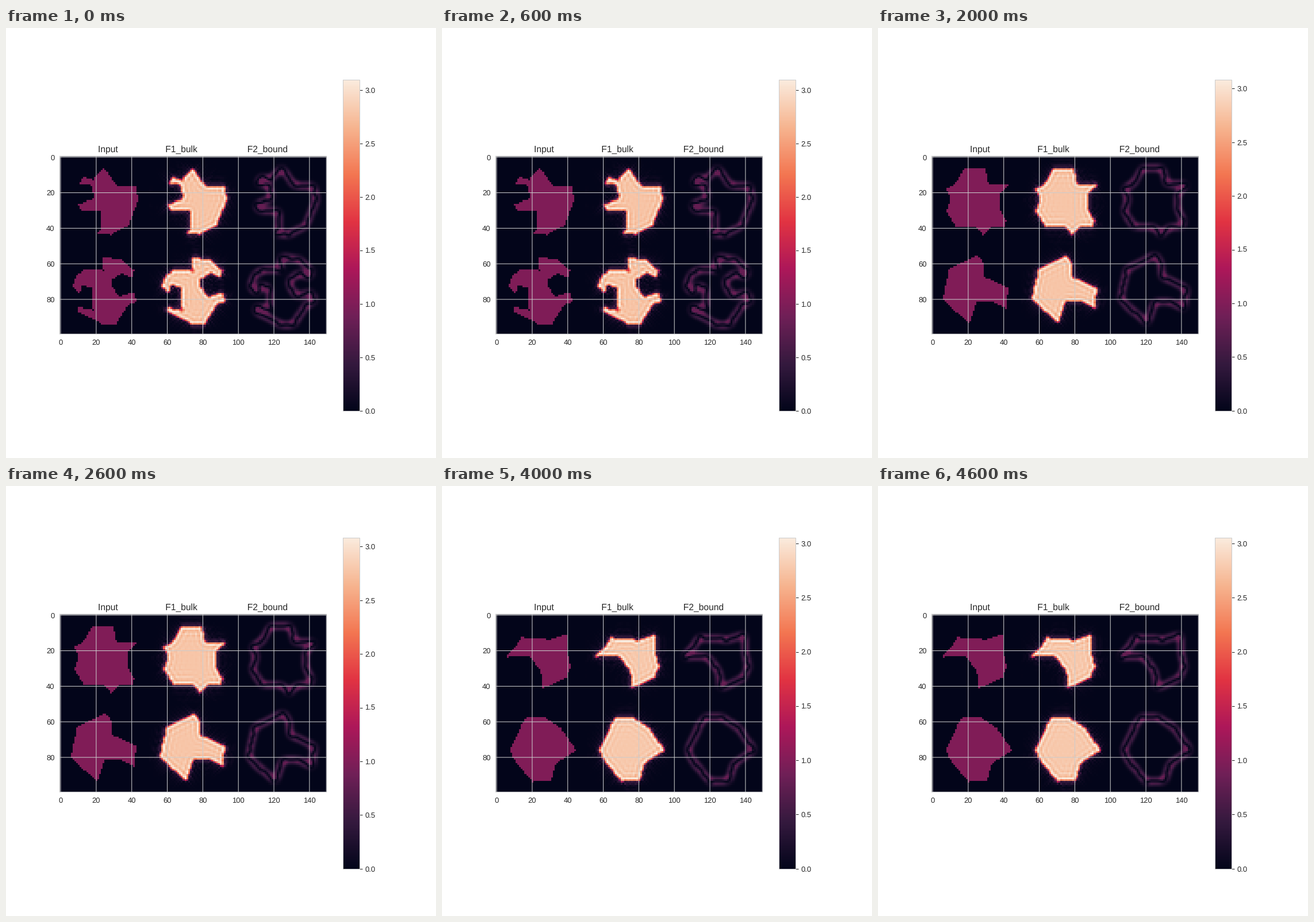
A matplotlib script for the animation above (5000 ms loop, 748 by 748 pixels).

```python
import numpy as np
import matplotlib.pyplot as plt
from matplotlib.animation import FuncAnimation
from matplotlib.colors import LinearSegmentedColormap
from matplotlib.path import Path

INK, RULE = "0.15", "0.8"
SIZE = 50

plt.rcParams.update({
    "font.family": "Liberation Sans", "text.hinting": "none",
    "text.color": INK, "xtick.color": INK, "ytick.color": INK,
    "axes.edgecolor": RULE, "grid.color": RULE,
    "axes.axisbelow": True, "xtick.bottom": False, "ytick.left": False,
})

EMBER = LinearSegmentedColormap.from_list("ember", [
    "#03051a", "#35193e", "#701f57", "#ad1759",
    "#e13342", "#f37651", "#f6b48f", "#faebdd"])

# Both filters depend only on radial frequency, in units of Nyquist
freq = 2 * np.fft.fftfreq(SIZE)
K = np.hypot(freq[:, None], freq[None, :])
LOW_PASS = np.exp(-(K / 0.72) ** 16)
EDGE_PASS = (K / 0.3) ** 2 * np.exp(1 - (K / 0.3) ** 2)
STRAIGHT_EDGE = 0.33    # peak of EDGE_PASS along a straight border


def respond(mask, transfer):
    return np.abs(np.fft.ifft2(np.fft.fft2(mask) * transfer).real)


def row(corners, top):
    """Mask, bulk response and boundary response, side by side."""
    y, x = np.mgrid[top:top + SIZE, :SIZE]
    inside = Path(corners).contains_points(np.column_stack([x.ravel(), y.ravel()]))
    mask = inside.reshape(SIZE, SIZE).astype(float)
    bulk = 2.78 * respond(mask, LOW_PASS)
    bound = 0.5 * (respond(mask, EDGE_PASS) / STRAIGHT_EDGE) ** 1.5
    return np.hstack([mask, bulk, np.minimum(bound, 0.8)])


def scene(vmax, upper, lower):
    return vmax, np.vstack([row(upper, 0), row(lower, SIZE)])


arms = scene(
    3.098,
    [(24.5, 6.5), (31, 16), (42, 16), (43.5, 24.5), (38, 38.5), (28, 44),
     (21, 43), (23, 40), (23, 31), (12, 30.5), (9.5, 27), (19, 23.5),
     (16.5, 15), (10.5, 15), (13, 11.5), (18, 13)],
    [(23, 56.5), (33.5, 57.5), (41, 64), (40.5, 68), (34, 65.5), (28.5, 69),
     (28.5, 73), (33, 78.5), (41, 76), (42.5, 81.5), (38, 83), (31, 94),
     (23, 94), (10, 87), (10, 84.5), (18, 86), (18, 74), (12, 72),
     (10.5, 77), (6.5, 73), (8.5, 67), (14.5, 63), (24, 64)])

hook = scene(
    3.115,
    [(13, 8.5), (31.5, 6.5), (36, 15), (43, 18.5), (42, 32), (40, 33.5),
     (39, 29), (29, 24.5), (24, 29), (27, 35), (32.5, 36), (32.5, 43),
     (20, 43), (11.5, 33), (7.5, 23), (11, 13)],
    [(24.5, 55), (33, 60), (36.5, 61.5), (42.5, 70), (38.5, 74.5),
     (37.5, 89.4), (18.5, 89.4), (10, 82), (7.4, 76), (7.4, 68), (12, 63)])

star = scene(
    3.084,
    [(18, 6), (29.5, 6.5), (31, 15), (42.5, 15.4), (37, 22), (37, 29),
     (41, 36), (40.5, 39.5), (33, 39), (28, 44), (24, 39), (13, 39),
     (7.5, 31), (10, 24), (7.5, 18), (13, 15)],
    [(25, 55), (28.5, 60), (28.5, 67.3), (42.5, 74), (41, 85), (34, 81.5),
     (25, 81), (20.5, 94), (5.5, 80), (9, 63.5)])

cog = scene(
    3.098,
    [(18, 6.5), (35.5, 6.8), (36, 14), (42.5, 20), (39.5, 30), (40.5, 36.5),
     (36.5, 41.3), (31, 41.3), (26.5, 37.3), (17, 38.5), (6.5, 31),
     (6.5, 28), (11.5, 24), (9.6, 16), (17, 12)],
    [(31, 59), (36.5, 61.5), (36, 71), (39.8, 82), (33, 93.3), (22, 93.3),
     (7.5, 76), (10.5, 66.5), (16.5, 70), (27.5, 67)])

boomerang = scene(
    3.054,
    [(14, 12.9), (30, 14.2), (39.4, 11), (39.5, 22), (41.5, 29), (39, 35.5),
     (26, 41.4), (24.8, 32), (18, 23), (6, 24), (6, 22.5), (11, 17.5)],
    [(16.5, 58), (26, 57.3), (36, 64), (44.5, 76), (33, 84), (30.5, 93.5),
     (20, 94), (8.5, 80), (7.4, 75.5), (14, 62)])

scenes = [arms, hook, star, cog, boomerang]

fig, ax = plt.subplots(figsize=(8, 8), dpi=93.5)
image = ax.imshow(arms[1], cmap=EMBER, vmin=0, vmax=arms[0],
                  interpolation="nearest")
ax.set_title("Input" + " " * 19 + "F1_bulk" + " " * 20 + "F2_bound")
ax.set_xticks(range(0, 150, 20))
ax.set_yticks(range(0, 100, 20))
ax.grid(True)
for line in [*ax.get_xgridlines(), *ax.get_ygridlines(), *ax.spines.values()]:
    line.set_snap(False)
bar = fig.colorbar(image, ax=ax)
bar.ax.tick_params(right=True)


def show(i):
    vmax, data = scenes[i]
    image.set_data(data)
    image.set_clim(0, vmax)
    return [image]


anim = FuncAnimation(fig, show, frames=len(scenes), interval=1000,
                     repeat=True, repeat_delay=0, blit=False)
plt.show()
```
